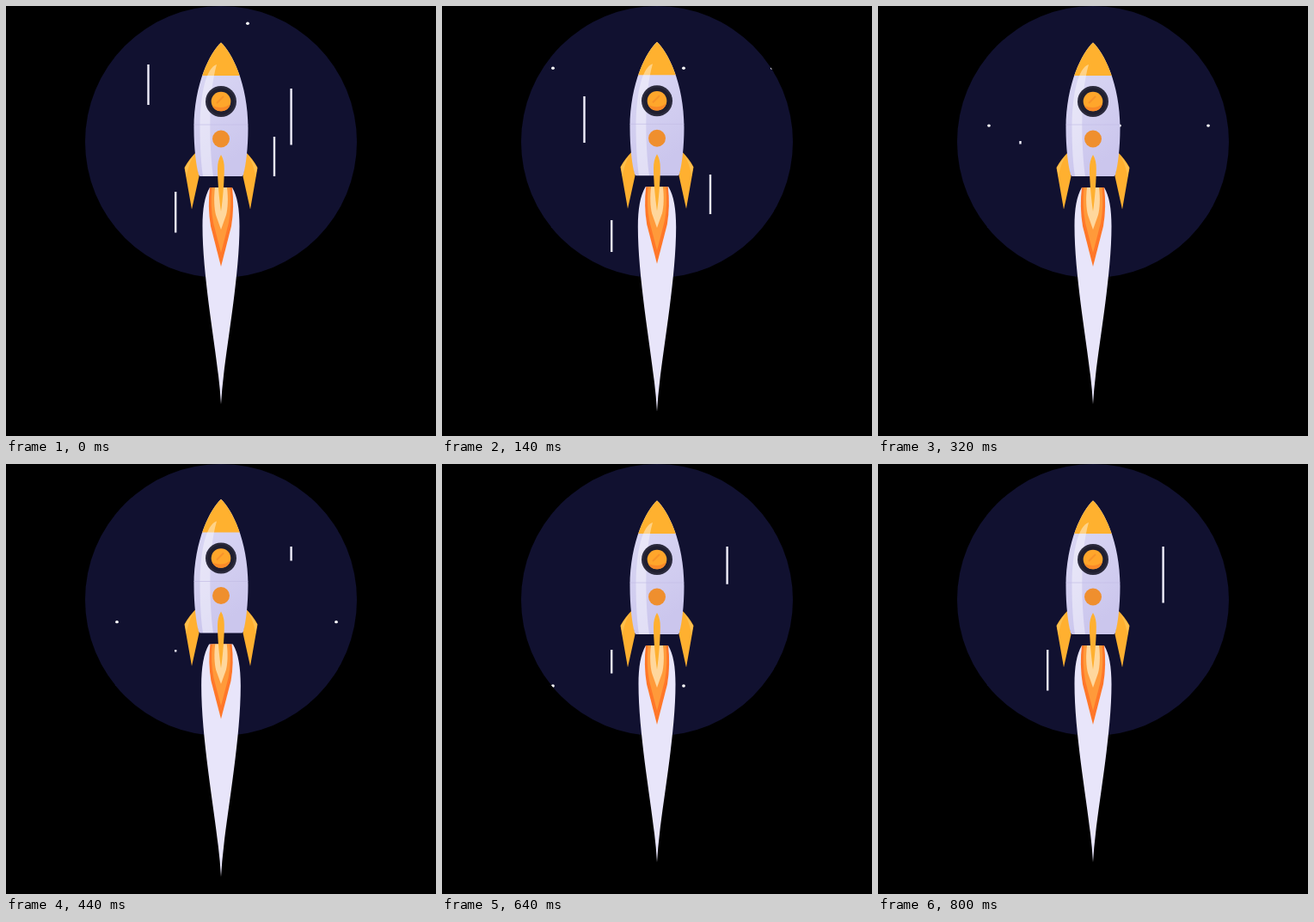
Write an HTML page that moves like this. It is 500 by 500 pixels and loops after 0.82 s.

```html
<!DOCTYPE html>
<html lang="en">
<head>
<meta charset="utf-8">
<title>Rocket</title>
<style>
  html, body { margin: 0; width: 100%; height: 100%; overflow: hidden; background: #000; }
  svg { display: block; width: 100vw; height: 100vh; }
</style>
</head>
<body>
<svg viewBox="0 0 500 500">
  <defs>
    <clipPath id="sky"><circle cx="250" cy="158" r="158"/></clipPath>
    <path id="hull" d="M250 42.5C262 53 281.5 90 281.5 142C281.5 165 279 185 276 196Q275.5 198 274 198H226Q224.5 198 224 196C221 185 218.5 165 218.5 142C218.5 90 238 53 250 42.5Z"/>
    <clipPath id="hullClip"><use href="#hull"/></clipPath>
    <linearGradient id="metal" x1="0" y1="0" x2="0.3" y2="1">
      <stop offset="0.3" stop-color="#d8d5f3"/>
      <stop offset="1" stop-color="#cbc6ed"/>
    </linearGradient>
    <g id="fin">
      <path d="M221.5 169.5C216 175 211 181 207.5 188L216 236.5L224.5 198C222.5 188 223 178 221.5 169.5Z" fill="#ffb030"/>
      <path d="M219 173C214 179 210.500 184 208 188L210 199C211 189 214 181 219 173Z" fill="#ffc04f"/>
    </g>
  </defs>

  <circle cx="250" cy="158" r="158" fill="#111130"/>
  <g clip-path="url(#sky)">
    <g id="stars" fill="#fff">
      <ellipse cx="129" rx="1.9" ry="1.7"/>
      <ellipse cx="281" rx="1.9" ry="1.7"/>
      <ellipse cx="384" rx="1.9" ry="1.7"/>
    </g>
    <g id="streaks" fill="none" stroke="#f1effc" stroke-width="2.4"></g>
  </g>

  <g id="rocket">
    <g transform="translate(250 211)">
      <path id="plume" fill="#e8e5fa" d="M-13 0C-19 10 -21.500 25 -21.500 45C-21.500 100 -8 175 -3 219Q-1 235 0 252Q1 235 3 219C8 175 21.500 100 21.500 45C21.500 25 19 10 13 0Z"/>
      <g id="flame">
        <path fill="#ff7729" d="M-13 0C-14.800 15 -14.500 30 -12 45L0 92L12 45C14.500 30 14.800 15 13 0Z"/>
        <path fill="#ff9a3a" d="M-10.500 0C-12 14 -11.500 28 -9 41L0 76L9 41C11.500 28 12 14 10.500 0Z"/>
        <path fill="#ffd79c" d="M-7 0C-8.500 12 -8 24 -6 32L0 49L6 32C8 24 8.500 12 7 0Z"/>
      </g>
    </g>

    <use href="#fin"/>
    <use href="#fin" transform="matrix(-1 0 0 1 500 0)"/>
    <use href="#hull" fill="url(#metal)"/>
    <g clip-path="url(#hullClip)">
      <rect x="215" y="40" width="70" height="41" fill="#ffb12f"/>
      <path id="shine" fill="#fff" fill-opacity="0.42" d="M245 68C233 72 226 100 225.500 140C225.500 165 227 185 229 198H241C237 170 234 105 245 68Z"/>
      <path d="M218 138H282" stroke="#c3bee6" stroke-width="0.7"/>
    </g>

    <circle cx="250" cy="111" r="18" fill="#2b2a3c"/>
    <circle cx="250" cy="111" r="13.500" fill="none" stroke="#201f30" stroke-width="4"/>
    <circle cx="250" cy="111" r="11.300" fill="#ffa62b"/>
    <path d="M240 116.300A11.300 11.300 0 0 0 261 113.500Q253 121 240 116.300Z" fill="#f98a28"/>
    <path d="M245 113L253 105" stroke="#f7932a" stroke-width="2"/>

    <circle cx="250" cy="154.500" r="10" fill="#ef8f2e"/>
    <path d="M250 173C247 178 246 183 246 189C246 205 248 225 250 239C252 225 253.800 205 253.800 189C253.800 183 253 178 250 173Z" fill="#ffb030"/>
  </g>
</svg>
<script>
const LOOP = 820, STEP = 20, BEAT = 160;
const $ = id => document.getElementById(id);

// Progress from a to b over the time span t0..t1, clamped.
const ramp = (t, t0, t1, a, b) =>
  a + (b - a) * Math.min(1, Math.max(0, (t - t0) / (t1 - t0)));

// Each streak gives its [top, bottom] at time t.
const streaks = [
  { x: 165.5, span: t => [ramp(t, 12, 332, 68, 160.5), ramp(t, 0, 145, 115, 160.5)] },
  { x: 312, span: t => [ramp(t, 0, 318, 152, 252), ramp(t, 0, 172, 198, 252)] },
  { x: 331.6, span: t => t < 320
      ? [ramp(t, 0, 120, 96, 161.5), 161.5]
      : [96, ramp(t, 320, 800, 96, 161.5)] },
  { x: 197.2, span: t => t < 400
      ? [ramp(t, 0, 297, 216, 286), ramp(t, 0, 140, 263.5, 286)]
      : [216, ramp(t, 420, 800, 216, 263.5)] }
];

for (const s of streaks) {
  s.el = document.createElementNS("http://www.w3.org/2000/svg", "path");
  $("streaks").append(s.el);
}

function draw(t) {
  const phase = (t % BEAT) / BEAT;
  const k = 1 - Math.abs(1 - 2 * phase);
  $("rocket").setAttribute("transform", `translate(0 ${-3 * k})`);
  $("plume").setAttribute("transform", `scale(${1 + 0.126 * k} ${1 + 0.147 * k})`);
  $("flame").setAttribute("transform", `scale(${1 - 0.07 * k} ${1 - 0.11 * k})`);
  $("stars").setAttribute("transform", `translate(0 ${20.2 + 0.3715 * t})`);
  for (const s of streaks) {
    const [top, bottom] = s.span(t);
    s.el.setAttribute("d", bottom > top ? `M${s.x} ${top}V${bottom}` : "");
  }
}

const start = performance.now();
function tick() {
  const t = (performance.now() - start) % LOOP;
  draw(Math.floor(t / STEP) * STEP);
  requestAnimationFrame(tick);
}
draw(0);
requestAnimationFrame(tick);
</script>
</body>
</html>
```
